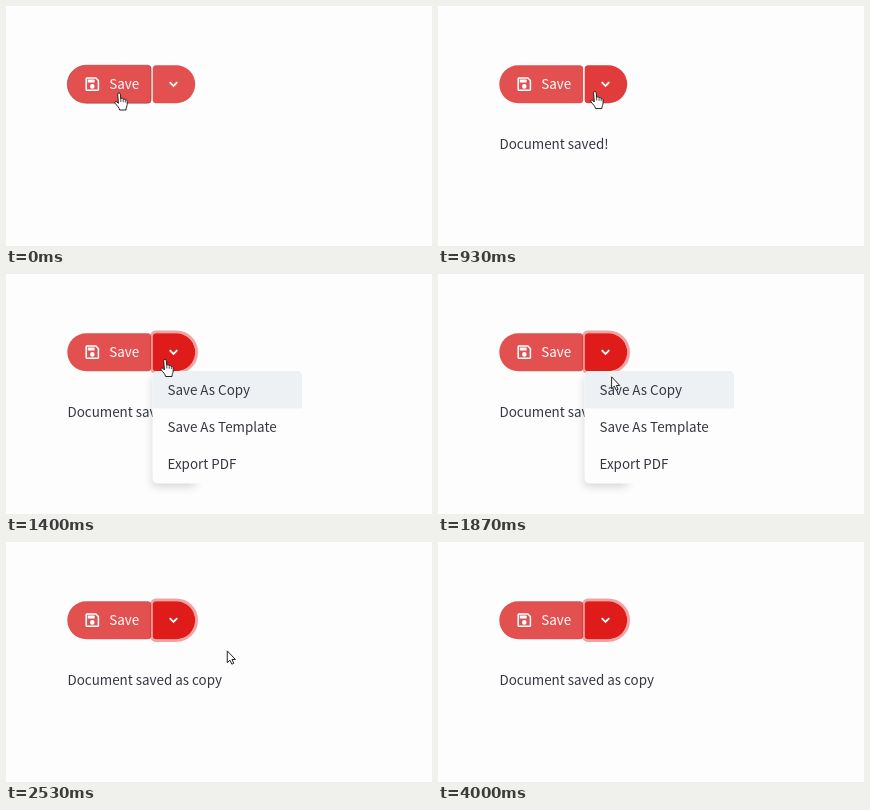
Recreate the animation shown at these times as an HTML page. Size 426 by 240 pixels, loop 4070 ms.

```html
<!DOCTYPE html>
<html lang="en">
<head>
<meta charset="utf-8">
<title>Split button</title>
<style>
  html, body { margin: 0; width: 100%; height: 100%; overflow: hidden; background: #fdfdfd; }
  svg { display: block; width: 426px; height: 240px; }
  text {
    font: 400 13.4px "Noto Sans CJK JP", "Noto Sans CJK SC", "Noto Sans CJK", "Source Sans Pro", "Open Sans", sans-serif;
    fill: #34373f;
  }
  #label { font-weight: 500; fill: #fff; }
  #shade { filter: blur(5px); }
  .pointer { fill: #fff; stroke: #222; stroke-linejoin: round; }
</style>
</head>
<body>
<svg viewBox="0 0 426 240">
  <text id="status" x="61.5" y="143"></text>

  <path id="save" stroke="#8f3535" stroke-width=".8"/>
  <path fill="#fff" transform="translate(77.2 69) scale(.76)" fill-rule="evenodd"
    d="M17 3H5c-1.1 0-2 .9-2 2v14c0 1.1.9 2 2 2h14c1.1 0 2-.9 2-2V7zM19 19H5V5h11.2L19 7.8zM12 12a3 3 0 1 0 0 6a3 3 0 0 0 0-6zM6 6h9v4H6z"/>
  <text id="label" x="103.2" y="82.7">Save</text>

  <path id="ring" fill="none" stroke="#df1c1a" stroke-width="2.8"/>
  <path id="drop"/>
  <path d="M163.7 76.1l3.8 3.8l3.8-3.8" fill="none" stroke="#fff" stroke-width="1.8"/>

  <g id="menu">
    <rect id="shade" x="147" y="104" width="42" height="108" fill="#283246" opacity=".22"/>
    <rect x="146.5" y="97" width="149.5" height="112.5" rx="5" fill="#fdfdfd"/>
    <path d="M146.5 134.5V102a5 5 0 0 1 5-5H291a5 5 0 0 1 5 5V134.5z" fill="#edf1f4"/>
  </g>

  <g id="hand">
    <path class="pointer" d="M-1.3 1.2C-1.3-.5 1.3-.5 1.4 1.2L1.8 6C2 4.8 4 4.8 4.2 6.5C4.6 5.6 6.2 5.9 6.3 7.2C7 6.6 8.2 7 8.2 8.4V11.5C8.2 13.5 7 14.2 7 17H.6C.5 14.8-1.8 13-3.8 10.3C-4.8 8.9-3.2 7.8-2 9L-.6 10.4z"/>
    <path d="M1.8 6V9M4.2 6.7V9.2M6.3 7.4V9.5" fill="none" stroke="#222" stroke-width=".8"/>
  </g>
  <path id="arrow" class="pointer" d="M.5.5V12.3L3.2 9.8L5.1 13.8L7 12.9L5.2 9.1H8.7z"/>
</svg>
<script>
const LOOP = 4070;
const CLICK = 400, OPEN = 1310, PICK = 2200, SAVED = 2330, HIDE = 3165;
const HOVER = .38;
const $ = id => document.getElementById(id);

// Box with one radius per side; grow pushes every edge outwards.
function pill(x0, x1, left, right, grow = 0) {
  const y0 = 59.2 - grow, y1 = 97.2 + grow;
  const l = left + grow, r = right + grow;
  x0 -= grow;
  x1 += grow;
  return `M${x0 + l} ${y0}H${x1 - r}A${r} ${r} 0 0 1 ${x1} ${y0 + r}V${y1 - r}` +
    `A${r} ${r} 0 0 1 ${x1 - r} ${y1}H${x0 + l}A${l} ${l} 0 0 1 ${x0} ${y1 - l}V${y0 + l}` +
    `A${l} ${l} 0 0 1 ${x0 + l} ${y0}z`;
}

$("save").setAttribute("d", pill(61.3, 145.1, 19, 3.5));
$("drop").setAttribute("d", pill(146.7, 189.2, 3.5, 19));
$("ring").setAttribute("d", pill(146.7, 189.2, 3.5, 19, 1.4));

["Save As Copy", "Save As Template", "Export PDF"].forEach((name, i) => {
  const item = document.createElementNS("http://www.w3.org/2000/svg", "text");
  item.setAttribute("x", 161.5);
  item.setAttribute("y", 121 + 37 * i);
  item.textContent = name;
  $("menu").append(item);
});

// Eased 0 to 1 from start over span.
function ramp(t, start, span) {
  const k = Math.min(1, Math.max(0, (t - start) / span));
  return k * k * (3 - 2 * k);
}

function red(shade) {
  const mix = (a, b) => Math.round(a + (b - a) * shade);
  return `rgb(${mix(227, 223)},${mix(80, 28)},${mix(80, 26)})`;
}

// Save button, arrow button, first menu item, resting place.
function pointerAt(t) {
  const toDrop = ramp(t, 670, 300), toItem = ramp(t, 1660, 420), away = ramp(t, SAVED, 540);
  return [
    113 + 46 * toDrop + 28 * toItem + 108 * away,
    87 - 1.5 * toDrop + 33.5 * toItem - 34 * away
  ];
}

function show(el, on) {
  el.style.display = on ? "" : "none";
}

function draw(t) {
  const hover = HOVER * ramp(t, 0, 130), press = (1 - HOVER) * ramp(t, CLICK - 50, 100);
  const leave = 1 - ramp(t, 720, 140);
  $("save").setAttribute("fill", red((hover + press) * leave));
  $("save").setAttribute("stroke-opacity", t < 65 ? .7 : 0);

  // Focus drops briefly while the menu item is picked.
  const dip = Math.exp(-(((t - PICK - 60) / 65) ** 2));
  const focus = ramp(t, OPEN - 60, 120);
  const over = HOVER * ramp(t, 780, 130);
  $("drop").setAttribute("fill", red(over + (1 - HOVER) * focus - .72 * dip));
  $("ring").setAttribute("stroke-opacity", .4 * focus * (1 - .6 * dip));

  $("menu").setAttribute("opacity", ramp(t, OPEN - 40, 80) - ramp(t, PICK - 20, 50));
  $("status").textContent = t < CLICK ? "" : t < SAVED ? "Document saved!" : "Document saved as copy";

  const [x, y] = pointerAt(t);
  const overButton = y < 97 && x < 189;
  for (const el of [$("hand"), $("arrow")]) el.setAttribute("transform", `translate(${x} ${y})`);
  show($("hand"), overButton);
  show($("arrow"), !overButton && t < HIDE);
}

const start = performance.now();
function tick() {
  draw((performance.now() - start) % LOOP);
  requestAnimationFrame(tick);
}
tick();
</script>
</body>
</html>
```
